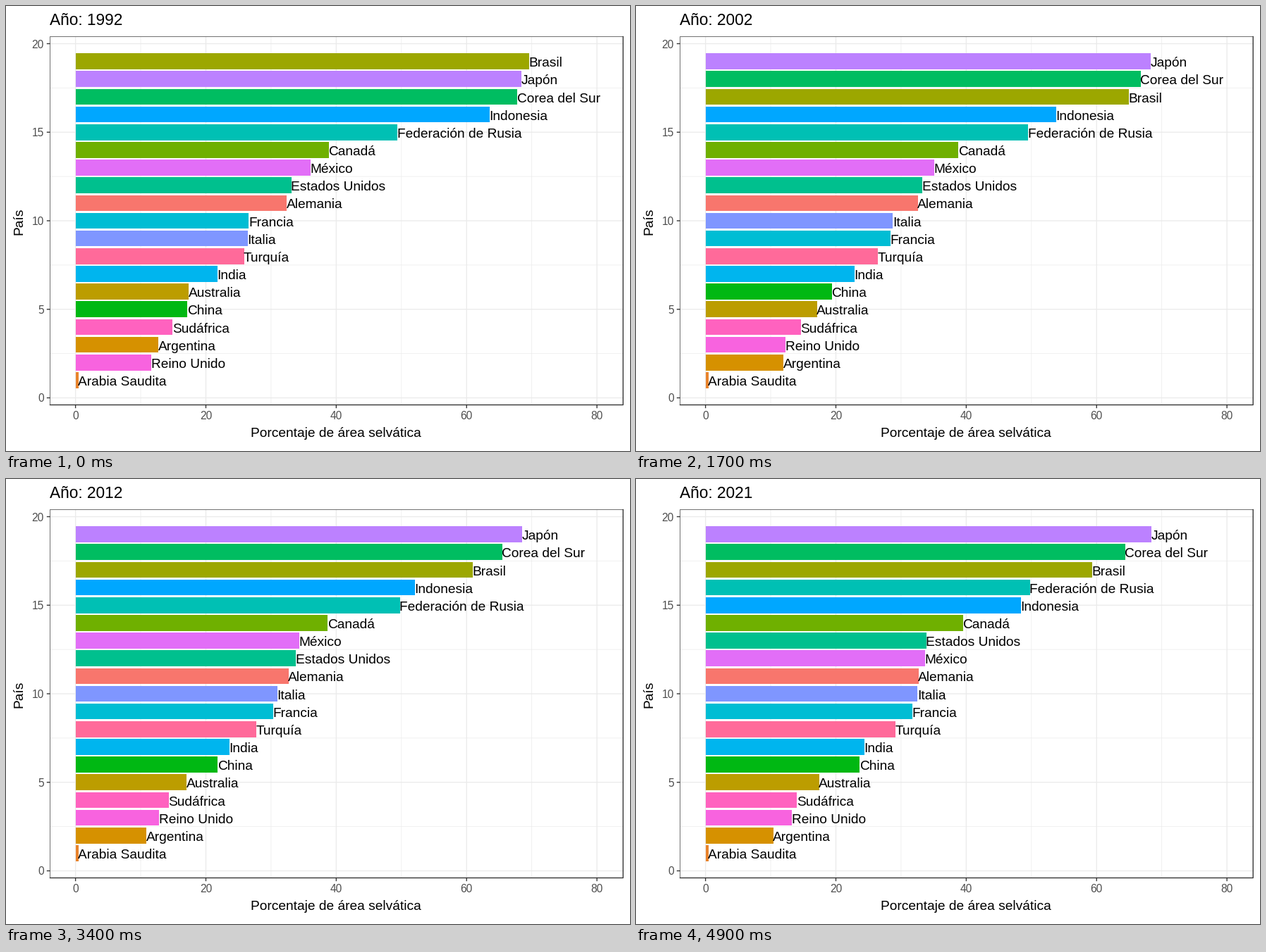
A matplotlib script for the animation above (5 s loop, 885x632 px).

```python
import numpy as np
import matplotlib.pyplot as plt
from matplotlib.animation import FuncAnimation
from matplotlib.patches import Rectangle

W, H, DPI = 885, 632, 100
FRAMES, INTERVAL = 50, 100
FIRST, LAST = 1992, 2021
DARK, GRID, TICK_TEXT = "#333333", "#ebebeb", "#4d4d4d"
LINE = 1.37  # width of the main lines in pixels
LABEL, TICK, TITLE = 19.2, 15.5, 22.6  # text sizes in pixels
LEFT, RIGHT, TOP, BOTTOM = 62.5, 875.2, 43.5, 566.5
ROW = 25.15
BAR = 0.9 * ROW

# Forest share (%) at four key years; linear in between.
KEY_YEARS = (1992, 2002, 2012, 2021)
SHARES = {
    "Alemania": (32.4, 32.6, 32.7, 32.7),
    "Arabia Saudita": (0.45, 0.45, 0.45, 0.45),
    "Argentina": (12.73, 11.96, 10.9, 10.4),
    "Australia": (17.38, 17.1, 17.05, 17.45),
    "Brasil": (69.55, 64.97, 60.9, 59.3),
    "Canadá": (38.85, 38.8, 38.7, 39.5),
    "China": (17.16, 19.4, 21.8, 23.65),
    "Corea del Sur": (67.8, 66.74, 65.45, 64.4),
    "Estados Unidos": (33.1, 33.3, 33.83, 33.86),
    "Federación de Rusia": (49.4, 49.5, 49.8, 49.8),
    "Francia": (26.6, 28.34, 30.3, 31.7),
    "India": (21.75, 22.85, 23.6, 24.35),
    "Indonesia": (63.55, 53.8, 52.1, 48.4),
    "Italia": (26.4, 28.76, 30.95, 32.55),
    "Japón": (68.4, 68.3, 68.5, 68.4),
    "México": (36.1, 35.05, 34.32, 33.71),
    "Reino Unido": (11.63, 12.29, 12.85, 13.27),
    "Sudáfrica": (14.9, 14.6, 14.3, 14.05),
    "Turquía": (25.85, 26.45, 27.7, 29.1),
}


def px(x):
    return 98.6 + 9.244 * x


def py(y):
    return 556.5 - ROW * y


def pt(pixels):
    return pixels * 72 / DPI


def hue_color(hue, chroma=100, lum=65):
    """Polar LUV to sRGB, clipped to the gamut."""
    h = np.radians(hue)
    y = ((lum + 16) / 116) ** 3
    u = chroma * np.cos(h) / (13 * lum) + 0.1978398
    v = chroma * np.sin(h) / (13 * lum) + 0.4683363
    x = 9 * y * u / (4 * v)
    z = -x / 3 - 5 * y + 3 * y / v
    to_rgb = np.array([[3.240479, -1.537150, -0.498535],
                       [-0.969256, 1.875992, 0.041556],
                       [0.055648, -0.204043, 1.057311]])
    rgb = np.clip(to_rgb @ (x, y, z), 0, 1)
    return np.where(rgb > 0.00304, 1.055 * rgb ** (1 / 2.4) - 0.055, 12.92 * rgb)


# Each year lands on a whole frame; shares and ranks run linearly between.
years = np.arange(FIRST, LAST + 1)
year_frames = np.round((FRAMES - 1) * (years - FIRST) / (LAST - FIRST))
shares = np.array([np.interp(years, KEY_YEARS, s) for s in SHARES.values()])
ranks = shares.argsort(axis=0).argsort(axis=0) + 1

plt.rcParams.update({"font.family": "Liberation Sans", "text.hinting": "native"})
fig = plt.figure(figsize=(W / DPI, H / DPI), dpi=DPI, facecolor="white")
ax = fig.add_axes([0, 0, 1, 1])
ax.set(xlim=(0, W), ylim=(H, 0))
ax.axis("off")


def line(xs, ys, color=DARK, width=LINE, z=1):
    ax.plot(xs, ys, color=color, lw=pt(width), zorder=z, snap=False,
            solid_capstyle="projecting" if z > 1 else "butt")


def write(x, y, text, size, color="black", ha="left", **kw):
    return ax.text(x, y, text, size=pt(size), color=color, ha=ha,
                   va="baseline", zorder=5, **kw)


for x in range(10, 80, 20):
    line([px(x)] * 2, [TOP, BOTTOM], GRID, LINE / 2)
for y in np.arange(2.5, 20, 5):
    line([LEFT, RIGHT], [py(y)] * 2, GRID, LINE / 2)
for x in range(0, 81, 20):
    line([px(x)] * 2, [TOP, BOTTOM], GRID)
    line([px(x)] * 2, [BOTTOM, BOTTOM + 4.7])
    write(px(x), 587, str(x), TICK, TICK_TEXT, "center")
for y in range(0, 21, 5):
    line([LEFT, RIGHT], [py(y)] * 2, GRID)
    line([LEFT - 4.7, LEFT], [py(y)] * 2)
    write(53.6, py(y) + 6, str(y), TICK, TICK_TEXT, "right")

# The frame looks thinner along its left and top sides.
line([LEFT, LEFT, RIGHT], [BOTTOM, TOP, TOP], width=LINE / 2, z=6)
line([LEFT, RIGHT, RIGHT], [BOTTOM, BOTTOM, TOP], z=6)

write(px(40), 612, "Porcentaje de área selvática", LABEL, ha="center")
write(23, 305.5, "País", LABEL, ha="center", rotation=90,
      rotation_mode="anchor")
title = write(62, 27, "", TITLE)

bars, labels = [], []
for k, name in enumerate(SHARES):
    color = hue_color(15 + 360 * k / len(SHARES))
    bars.append(ax.add_patch(Rectangle((px(0), 0), 1, BAR, fc=color, lw=0,
                                       zorder=3, snap=True)))
    labels.append(write(0, 0, name, LABEL))


def update(frame):
    year = FIRST + (LAST - FIRST) * frame / (FRAMES - 1)
    title.set_text(f"Año: {round(year)}")
    for bar, label, share, rank in zip(bars, labels, shares, ranks):
        end = px(np.interp(frame, year_frames, share))
        row = py(np.interp(frame, year_frames, rank))
        bar.set_y(row - BAR / 2)
        bar.set_width(end - px(0))
        label.set_position((end - 0.5, row + 7.6))
    return [title, *bars, *labels]


anim = FuncAnimation(fig, update, frames=FRAMES, interval=INTERVAL,
                     repeat=True, repeat_delay=0, blit=False)
plt.show()
```
